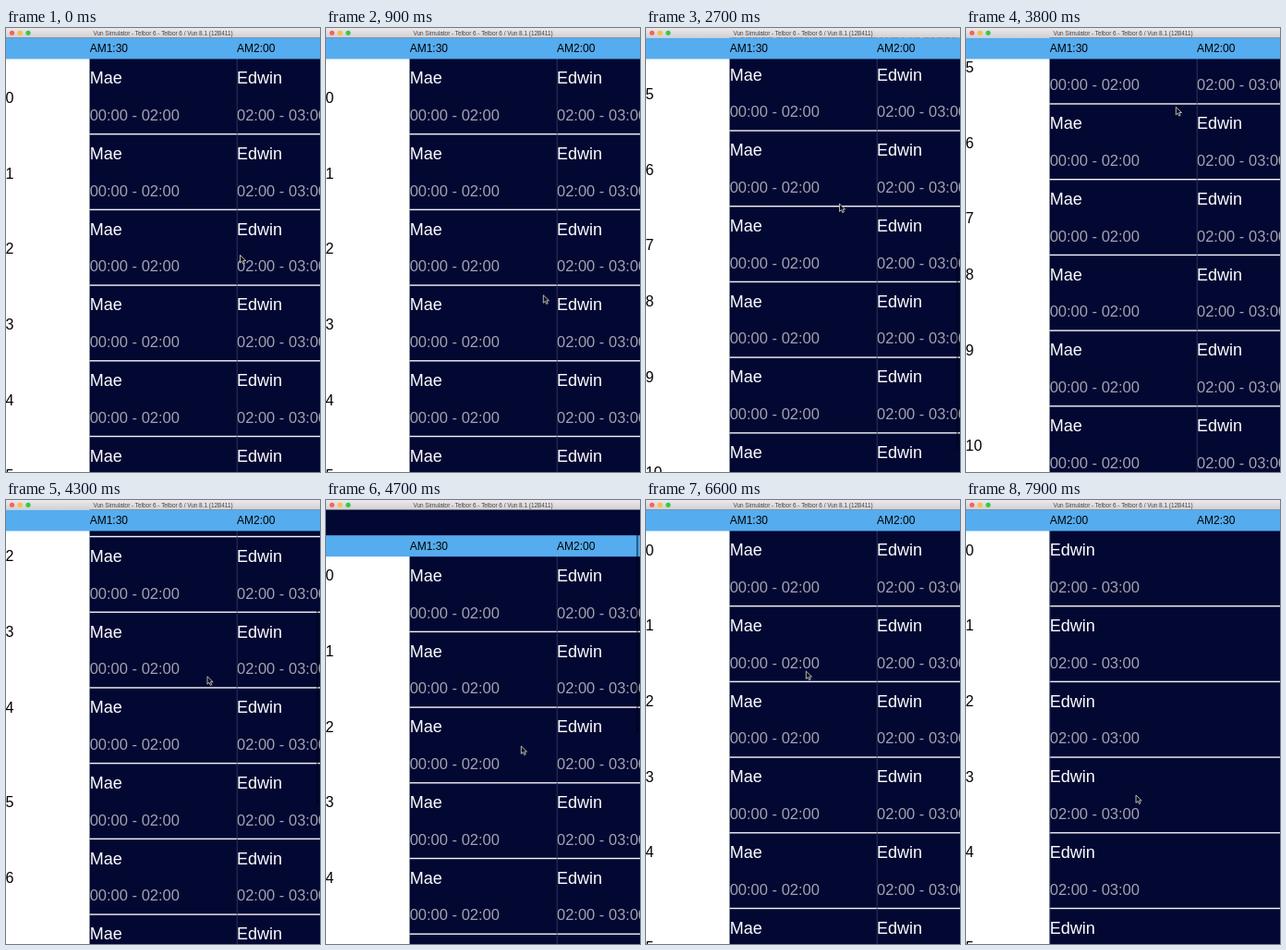
Recreate the animation shown at these times as an HTML page. Size 340 px wide and 480 px high, loop 8000 ms.

```html
<!DOCTYPE html>
<html lang="en">
<head>
<meta charset="utf-8">
<title>Schedule grid</title>
<style>
  html, body { margin: 0; width: 100%; height: 100%; overflow: hidden; background: #fff; }
  svg { display: block; width: 340px; height: 480px; font-family: "Liberation Sans", Arial, sans-serif; }
  .name { font-size: 18px; fill: #fff; }
  .hours { font-size: 16.5px; fill: #a3a3ac; }
  .label { font-size: 16px; fill: #000; }
  .slot { font-size: 12px; fill: #000; }
</style>
</head>
<body>
<svg viewBox="0 0 340 480">
  <defs>
    <linearGradient id="chrome" x2="0" y2="1">
      <stop stop-color="#ebe9eb"/><stop offset="1" stop-color="#d2d0d2"/>
    </linearGradient>
    <clipPath id="right"><rect x="90.5" width="249.5" height="480"/></clipPath>
  </defs>
  <rect width="340" height="480" fill="#030833"/>
  <g id="labelColumn">
    <rect y="33" width="90.5" height="1100" fill="#fff"/>
    <g id="labels"></g>
  </g>
  <g clip-path="url(#right)"><g id="cells"></g></g>
  <g id="header">
    <rect y="10.5" width="340" height="23" fill="#55acee"/>
    <g clip-path="url(#right)"><g id="slots"></g></g>
  </g>
  <rect id="indicator" x="336" width="2.2" height="215" rx="1.1" fill="#000" opacity="0"/>
  <rect width="340" height="10.5" fill="url(#chrome)"/>
  <circle cx="6.5" cy="5.3" r="2.6" fill="#fc605c"/>
  <circle cx="15.2" cy="5.3" r="2.6" fill="#fdbc40"/>
  <circle cx="24" cy="5.3" r="2.6" fill="#34c84a"/>
  <text x="170" y="7.7" font-size="6.4" text-anchor="middle" fill="#444">Vun Simulator - Telbor 6 - Telbor 6 / Vun 8.1 (12B411)</text>
  <path id="cursor" d="M0 0V8.4L2 6.6L3.4 9.6L4.9 8.9L3.5 6H6.2Z" fill="#111" stroke="#ddd" stroke-width=".8"/>
</svg>
<script>
const LOOP = 8000, TOP = 33, ROW = 81.7, COLUMN = 159.3, ROWS = 12;
const REALIGN = 3300;
const $ = id => document.getElementById(id);

function add(parent, tag, attrs, text = "") {
  const node = document.createElementNS("http://www.w3.org/2000/svg", tag);
  for (const key in attrs) node.setAttribute(key, attrs[key]);
  node.textContent = text;
  return parent.appendChild(node);
}

const events = [["Mae", "00:00 - 02:00"], ["Edwin", "02:00 - 03:00"]];
const labels = [];
for (let row = 0; row < ROWS; row++) {
  const y = TOP + row * ROW;
  events.forEach(([name, hours], i) => {
    const x = 90.7 + i * COLUMN;
    add($("cells"), "text", { x, y: y + 27.3, class: "name" }, name);
    add($("cells"), "text", { x, y: y + 67, class: "hours" }, hours);
  });
  add($("cells"), "rect", { x: 0, y: y + ROW - .7, width: 800, height: 1.4, fill: "#f4f4f8" });
  labels.push(add($("labels"), "text", { x: -.4, class: "label" }, row));
}
add($("cells"), "rect", { x: 249.8, y: TOP, width: .8, height: ROWS * ROW, fill: "#353c66" });
["AM1:30", "AM2:00", "AM2:30", "AM3:00"].forEach((text, i) =>
  add($("slots"), "text", { x: 90.7 + i * COLUMN, y: 26.4, class: "slot" }, text));

// Keys are [time, value, ...]; each stretch eases in and out.
function track(keys, t) {
  const i = keys.findIndex(key => key[0] > t);
  if (i < 0) return keys[keys.length - 1].slice(1);
  if (i === 0) return keys[0].slice(1);
  const [a, b] = [keys[i - 1], keys[i]];
  const u = (t - a[0]) / (b[0] - a[0]), k = u * u * (3 - 2 * u);
  return a.slice(1).map((v, n) => v + (b[n + 1] - v) * k);
}

const scrollY = [[1950, 0], [2700, 412.2], [3100, 441.2], [3900, 441.2], [4600, -27.7], [4750, -27.7], [5150, 0]];
const scrollX = [[7150, 0], [7700, COLUMN]];
const pointer = [
  [0, 253.5, 245.5], [1900, 214, 339.5], [2700, 209.5, 190], [3800, 227.3, 85.5],
  [4700, 211.3, 266], [6600, 173.3, 185], [7900, 184, 319]
];

const move = (id, x, y) => $(id).setAttribute("transform", `translate(${x} ${y})`);

// Reused label cells come back top-aligned instead of centred.
const isTopAligned = (row, t) => row === 8 || row === 9 || (row < 5 && t > REALIGN);

function draw(t) {
  const [y] = track(scrollY, t), [x] = track(scrollX, t);
  const pull = Math.max(0, -y);
  move("cells", -x, -y);
  move("labelColumn", 0, -y);
  move("slots", -x, 0);
  move("header", 0, pull);
  move("cursor", ...track(pointer, t));
  labels.forEach((label, row) =>
    label.setAttribute("y", TOP + row * ROW + (isTopAligned(row, t) ? 26.6 : 47.8)));
  const scrolling = (t > 1950 && t < 3400) || (t > 3900 && t < 5400);
  $("indicator").setAttribute("opacity", scrolling ? .45 : 0);
  $("indicator").setAttribute("y", 36 + Math.max(0, y) * .5);
}

let start;
function tick(now) {
  start ??= now;
  draw((now - start) % LOOP);
  requestAnimationFrame(tick);
}
draw(0);
requestAnimationFrame(tick);
</script>
</body>
</html>
```
